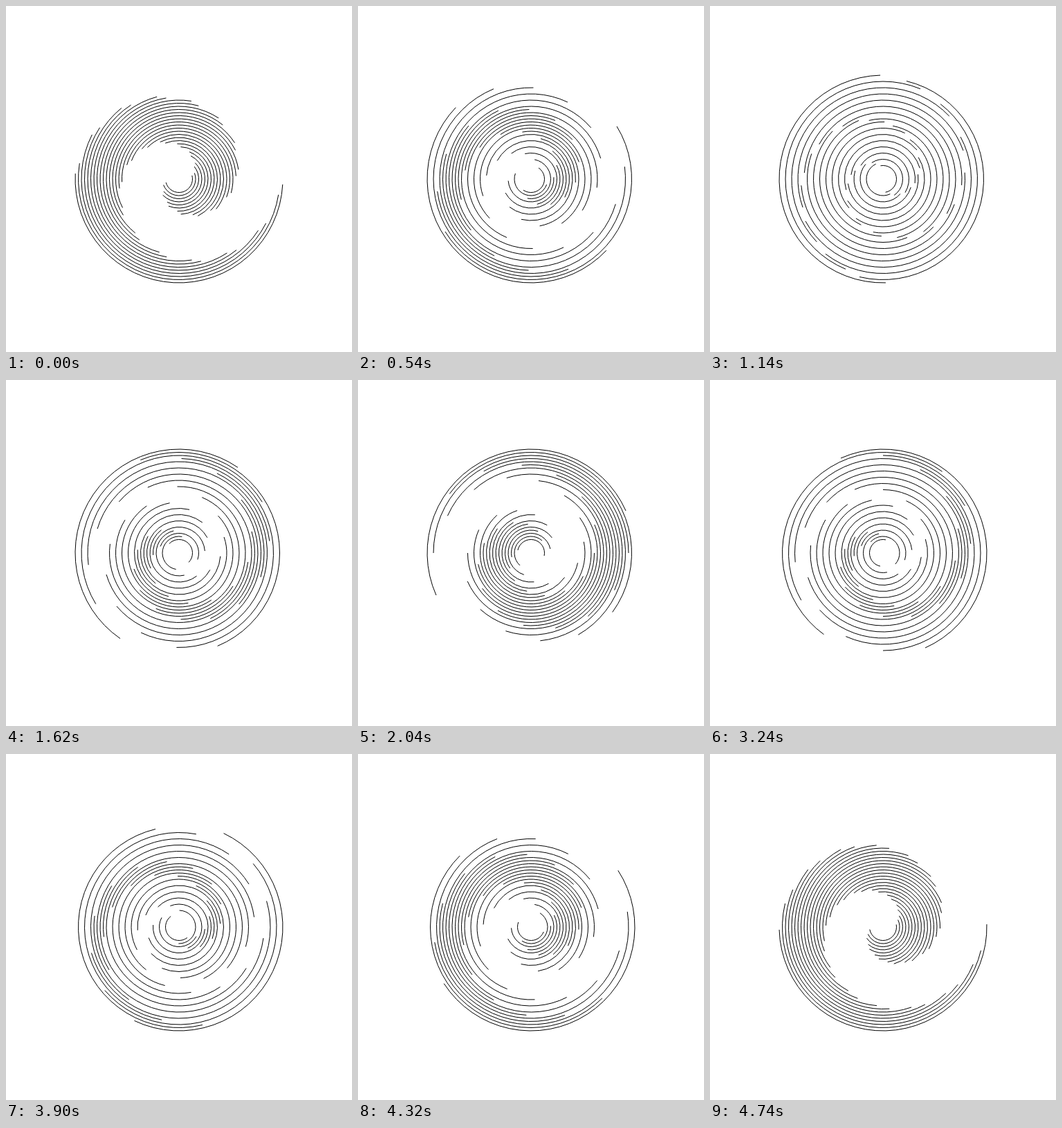
An HTML page with a canvas for the animation above (4.8 s loop, 500 by 500 pixels).

```html
<!DOCTYPE html>
<html lang="en">
<head>
<meta charset="utf-8">
<title>Counter-rotating arcs</title>
<style>
  html, body { margin: 0; width: 100%; height: 100%; overflow: hidden; background: #fff; }
  canvas { display: block; }
</style>
</head>
<body>
<canvas id="stage" width="500" height="500"></canvas>
<script>
  const ctx = document.getElementById("stage").getContext("2d");
  const ARCS = 30, OUTER = 150, GAP = 4.5;
  const LOOP = 4800, STEP = 60;
  const rad = degrees => degrees * Math.PI / 180;

  function draw(time) {
    // The motion advances in discrete steps, one full turn per loop.
    const step = Math.floor((time % LOOP) / STEP);
    const turn = 3 + step * 360 * STEP / LOOP;

    ctx.fillStyle = "#fff";
    ctx.fillRect(0, 0, 500, 500);
    ctx.strokeStyle = "#000";
    ctx.lineWidth = 1;

    // Half circles, fanned out by 12 degrees; neighbours spin in opposite directions.
    for (let i = 0; i < ARCS; i++) {
      const start = rad(i * 360 / ARCS + (i % 2 ? -turn : turn));
      ctx.beginPath();
      ctx.arc(250, 250, OUTER - i * GAP, start, start + Math.PI);
      ctx.stroke();
    }
  }

  const begin = performance.now();
  function tick() {
    draw(performance.now() - begin);
    requestAnimationFrame(tick);
  }
  tick();
</script>
</body>
</html>
```
